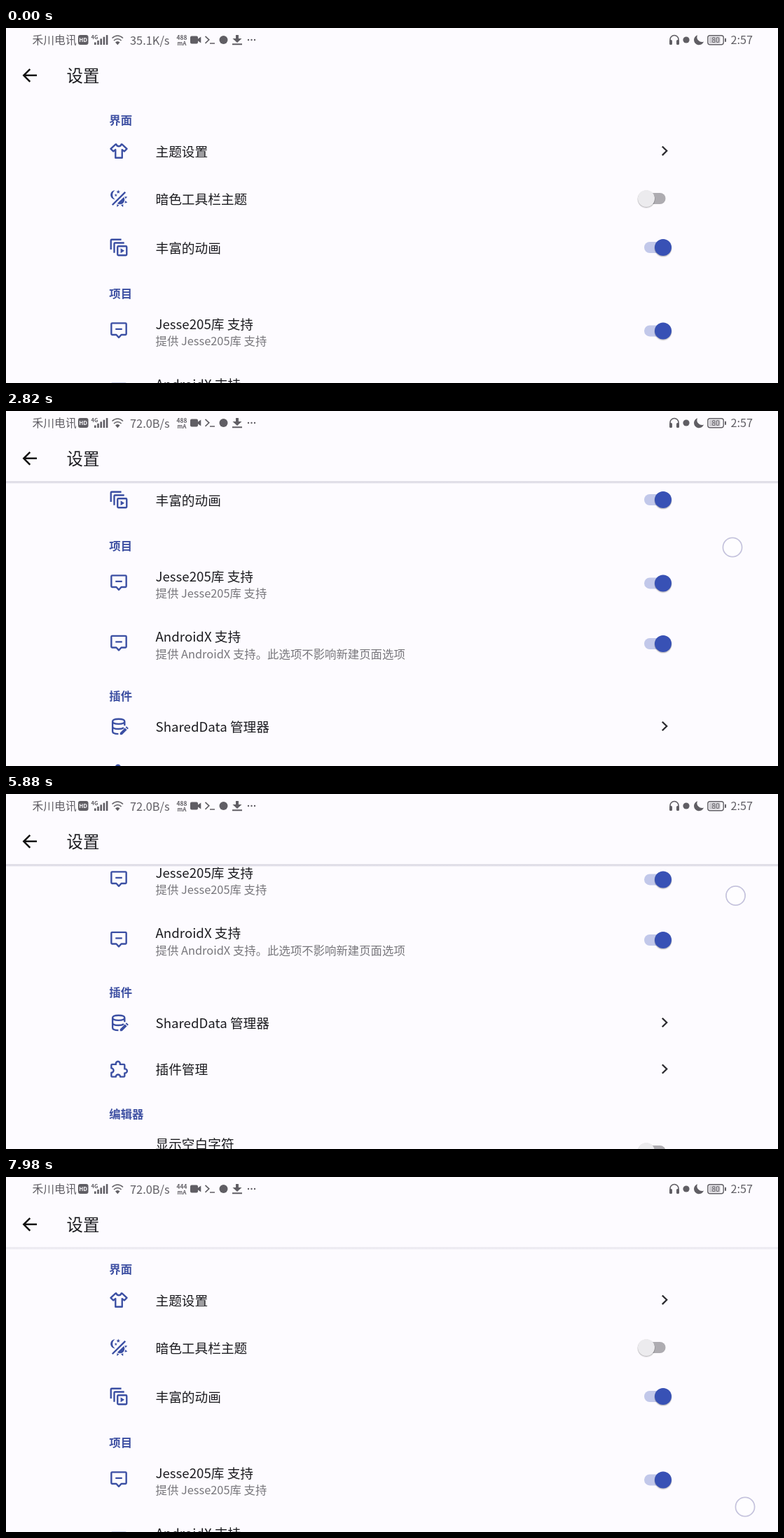
An HTML page for the animation above (8000 ms loop, 1102 by 508 pixels).

```html
<!DOCTYPE html>
<html lang="zh-CN">
<head>
<meta charset="utf-8">
<title>设置</title>
<style>
html, body { margin: 0; width: 100%; height: 100%; overflow: hidden; background: #fdfbff; }
svg { display: block; width: 1102px; height: 508px; }
text { font-family: "Noto Sans CJK SC", "Noto Sans CJK JP", "Noto Sans CJK", "Noto Sans", sans-serif; fill: #1b1b1f; white-space: pre; }
.title { font-size: 23.4px; font-weight: 500; }
.head { font-size: 16.4px; font-weight: 700; fill: #3f51a3; }
.name { font-size: 18.7px; }
.note { font-size: 16.4px; fill: #77767b; }
.bar { font-size: 15.8px; fill: #605e64; }
.tiny { font-size: 8px; font-weight: 700; fill: #605e64; }
.line { fill: none; stroke: #3b4fa3; stroke-width: 2; stroke-linejoin: round; }
.solid { fill: #3b4fa3; }
.grey { fill: #605e64; }
.greyLine { fill: none; stroke: #605e64; stroke-width: 1.6; }
</style>
</head>
<body>
<svg viewBox="0 0 1102 508">
  <defs>
    <clipPath id="view"><rect y="101" width="1102" height="407"/></clipPath>
    <linearGradient id="shade" x2="0" y2="1">
      <stop offset="0" stop-color="#d5d3dd"/>
      <stop offset=".4" stop-color="#dedce6"/>
      <stop offset="1" stop-color="#fdfbff"/>
    </linearGradient>
  </defs>
  <rect width="1102" height="508" fill="#fdfbff"/>
  <g clip-path="url(#view)"><g id="list"></g></g>
  <rect id="divider" y="100.5" width="1102" height="4" fill="url(#shade)" opacity="0"/>
  <path d="M44 67.8H26M34.3 58.8L25.3 67.8L34.3 76.8" fill="none" stroke="#111" stroke-width="2.5"/>
  <text class="title" x="86.5" y="77.3">设置</text>
  <g id="status"></g>
  <g id="touch" visibility="hidden">
    <circle r="14" fill="#fff" fill-opacity=".55" stroke="#fff" stroke-width="3.6"/>
    <circle r="13.6" fill="none" stroke="#c6c3de" stroke-width="1.8"/>
  </g>
</svg>
<script>
const LOOP = 8000;
const $ = id => document.getElementById(id);

const text = (cls, x, y, s, extra = '') => `<text class="${cls}" x="${x}" y="${y}" ${extra}>${s}</text>`;
const path = (cls, d, extra = '') => `<path class="${cls}" d="${d}" ${extra}/>`;

// Icons on a 24-unit grid
const icons = {
  shirt: path('line', 'M8 4L2.3 9.4L5.3 12.4L8 10.4V20.2H16V10.4L18.7 12.4L21.7 9.4L16 4H15C14.4 7 9.6 7 9 4Z'),
  theme: path('solid', 'M7.5 2c-1.79 1.15-3 3.18-3 5.5s1.21 4.35 3.03 5.5C4.46 13 2 10.54 2 7.5A5.5 5.5 0 0 1 7.5 2' +
    'm11.57 1.5l1.43 1.43L4.93 20.5L3.5 19.07L19.07 3.5m-6.18 2.43L11.41 5L9.97 6l.42-1.7L9 3.24l1.75-.12l.58-1.65L12 3.1l1.73.03l-1.35 1.13l.51 1.67' +
    'm-3.3 3.61l-1.16-.73l-1.12.78l.34-1.32l-1.09-.83l1.36-.09l.45-1.29l.51 1.27l1.36.03l-1.05.87l.4 1.31' +
    'M19 13.5a5.5 5.5 0 0 1-5.5 5.5c-1.22 0-2.35-.4-3.26-1.07l7.69-7.69c.67.91 1.07 2.04 1.07 3.26' +
    'm-4.4 6.58l2.77-1.15l-.24 3.35l-2.53-2.2m4.33-2.7l1.15-2.77l2.2 2.54l-3.35.23m1.15-4.96l-1.14-2.78l3.34.24l-2.2 2.54' +
    'M9.63 18.93l2.77 1.15l-2.53 2.19l-.24-3.34z'),
  layers: path('line', 'M2.5 14.5V3.5a1 1 0 0 1 1-1H15M6.5 18.5V7.5a1 1 0 0 1 1-1H18.5M10.5 11.5a1 1 0 0 1 1-1H20.5a1 1 0 0 1 1 1V20.5a1 1 0 0 1-1 1H11.5a1 1 0 0 1-1-1Z') +
    path('solid', 'M14.2 13v6l4.6-3z'),
  message: path('line', 'M3 4a1 1 0 0 1 1-1H20a1 1 0 0 1 1 1V16a1 1 0 0 1-1 1H15L12 20.3L9 17H4a1 1 0 0 1-1-1ZM8 10.2H16'),
  data: path('line', 'M4.5 6C4.5 2 19 2 19 6S4.5 10 4.5 6V18C4.5 20 8 21 11.5 21M4.5 12C4.5 14 8 15 11.7 15C14 15 16.5 14.6 18 13.5M19 6V11') +
    path('solid', 'M13.5 19.6V22H15.9L21.8 16.1L19.4 13.7ZM20.1 13L21.3 11.8L23.7 14.2L22.5 15.4Z'),
  puzzle: path('line', 'M3 10.6V7a1 1 0 0 1 1-1H8.5V5a2.5 2.5 0 0 1 5 0V6H18a1 1 0 0 1 1 1V11.5H19.5a2.5 2.5 0 0 1 0 5H19V20a1 1 0 0 1-1 1H13.8a2.7 2.7 0 0 0-5.4 0H4a1 1 0 0 1-1-1V16a2.7 2.7 0 0 0 0-5.4Z'),
};
const icon = (name, y) => `<g transform="translate(146.8 ${y - 14.2}) scale(1.185)">${icons[name]}</g>`;

const chevron = y => path('', `M936.8 ${y - 6.3}L943.2 ${y}L936.8 ${y + 6.3}`, 'fill="none" stroke="#2b2a2f" stroke-width="2.3"');

function toggle(y, on) {
  const x = on ? 938 : 914;
  return `<rect x="${on ? 911 : 908}" y="${y - 8}" width="${on ? 36 : 33.5}" height="16" rx="8" fill="${on ? '#c2c8ea' : '#aeacb1'}"/>
    <circle cx="${x}" cy="${y + 1.3}" r="12.7" fill="#000" opacity=".1"/>
    <circle cx="${x}" cy="${y + .7}" r="12.3" fill="#000" opacity=".14"/>
    <circle cx="${x}" cy="${y}" r="12" fill="${on ? '#3851b5' : '#ecebee'}"/>`;
}

const head = (y, s) => text('head', 147.3, y + 6.1, s);
const name = (y, s) => text('name', 213.5, y + 7, s);
const note = (y, s) => text('note', 213.5, y + 6.1, s);

$('list').innerHTML = [
  head(132, '界面'),
  icon('shirt', 176), name(176.5, '主题设置'), chevron(175.8),
  icon('theme', 244), name(244.7, '暗色工具栏主题'), toggle(244, false),
  icon('layers', 314), name(314.5, '丰富的动画'), toggle(314, true),
  head(380, '项目'),
  icon('message', 433), name(423.7, 'Jesse205库 支持'), note(448, '提供 Jesse205库 支持'), toggle(433.4, true),
  icon('message', 519.5), name(510.2, 'AndroidX 支持'), note(534.5, '提供 AndroidX 支持。此选项不影响新建页面选项'), toggle(520, true),
  head(594.5, '插件'),
  icon('data', 638.4), name(639, 'SharedData 管理器'), chevron(638),
  icon('puzzle', 705), name(705.3, '插件管理'), chevron(704.5),
  head(769, '编辑器'),
  name(811.8, '显示空白字符'), toggle(822, false),
].join('');

const bars = [0, 1, 2, 3, 4].map(i =>
  `<rect class="grey" x="${126 + i * 4.2}" y="${20.5 - i * 2.6}" width="2.6" height="${3.5 + i * 2.6}"/>`).join('');
const dots = [346, 350.5, 355].map(x => `<circle class="grey" cx="${x}" cy="17" r="1.2"/>`).join('');

$('status').innerHTML = [
  text('bar', 37.5, 23.4, '禾川电讯'),
  '<rect class="grey" x="103" y="10" width="14.5" height="14" rx="3"/>',
  text('tiny', 110.2, 20, 'HD', 'text-anchor="middle" style="fill:#fdfbff"'),
  text('tiny', 121.5, 16.3, '4G', 'style="font-size:7.5px"'), bars,
  path('greyLine', 'M151.5 14.5Q159.3 7.5 167 14.5M154 18Q159.3 13 164.6 18'),
  path('grey', 'M156 20.6Q159.3 17.6 162.6 20.6L159.3 24.2Z'),
  text('bar', 177, 23.6, '', 'id="speed" style="font-size:16.4px"'),
  text('tiny', 251, 17.3, '', 'id="amps" text-anchor="middle" style="font-size:8.4px"'),
  text('tiny', 251, 25, 'mA', 'text-anchor="middle"'),
  path('grey', 'M265 11.5H272a2 2 0 0 1 2 2V15.5L278.3 12.5V21.5L274 18.5V20.5a2 2 0 0 1-2 2H265a2 2 0 0 1-2-2V13.5a2 2 0 0 1 2-2Z'),
  path('greyLine', 'M284.5 11.8L289.8 16.8L284.5 21.8M291 22H298'),
  '<circle class="grey" cx="310.5" cy="17" r="6"/>',
  path('grey', 'M328 10H332V15H336.5L330 21L323.5 15H328ZM323 22.2H337V24.2H323Z'), dots,
  path('greyLine', 'M948 19V16.5a6 6 0 0 1 12 0V19'),
  '<rect class="grey" x="947" y="17" width="4" height="7" rx="1.5"/><rect class="grey" x="957" y="17" width="4" height="7" rx="1.5"/>',
  '<circle class="grey" cx="971" cy="17" r="4.6"/>',
  path('grey', 'M987 10.2A7.2 7.2 0 1 0 996 19.5A7 7 0 0 1 987 10.2Z'),
  '<rect class="greyLine" x="1001.8" y="10.8" width="22.4" height="13" rx="3" style="stroke-width:1.4"/>',
  '<rect class="grey" x="1003.6" y="12.6" width="16" height="9.4" rx="1" opacity=".3"/>',
  '<rect class="grey" x="1026" y="14.5" width="2" height="5.5" rx="1"/>',
  text('tiny', 1013, 21.2, '80', 'text-anchor="middle" style="font-size:10.5px;font-weight:500"'),
  text('bar', 1034.5, 23.4, '2:57', 'style="font-size:16.2px"'),
].join('');

// Each drag: [ms, finger x, finger y, scroll]
const drags = [
  [[1940, 1040.5, 404, 0], [2060, 1040.5, 404, 0], [2120, 1039, 381, 0], [2260, 1035, 327, 52.5], [2360, 1035, 327, 52.5],
   [2820, 1037, 195, 187], [2920, 1037, 195, 187], [3620, 1045, 86, 308], [3660, 1045, 84, 310], [3760, 1045, 84, 310],
   [4200, 1044, 110, 285], [4480, 1044, 110, 285], [5040, 1045, 84, 311]],
  [[5880, 1041.5, 145.5, 311], [6000, 1041.5, 145.5, 311], [6060, 1041.5, 161, 311], [6740, 1042, 397, 75], [6840, 1042, 397, 75],
   [7020, 1042, 429, 43.2], [7120, 1042, 429, 43.2], [7580, 1052, 460, 12], [7680, 1052, 460, 12], [7900, 1055, 472, 0], [LOOP, 1055, 472, 0]],
];

function sample(keys, t) {
  const i = keys.findIndex(k => k[0] > t);
  if (i < 1) return keys[i < 0 ? keys.length - 1 : 0];
  const a = keys[i - 1], b = keys[i], p = (t - a[0]) / (b[0] - a[0]);
  return a.map((v, j) => v + (b[j] - v) * p);
}

const clamp = v => Math.max(0, Math.min(1, v));

function draw(t) {
  const [first, second] = drags;
  const [, x, y, scroll] = sample(t < second[0][0] ? first : second, t);
  const touching = drags.some(d => t >= d[0][0] && t < d[d.length - 1][0]);
  $('list').setAttribute('transform', `translate(0 ${-scroll})`);
  $('touch').setAttribute('transform', `translate(${x} ${y})`);
  $('touch').setAttribute('visibility', touching ? 'visible' : 'hidden');
  $('divider').setAttribute('opacity', Math.min(clamp((t - 2110) / 280), clamp((8080 - t) / 180)));
  $('speed').textContent = t < 2500 ? '35.1K/s' : '72.0B/s';
  $('amps').textContent = t < 7300 ? '488' : '444';
}

const start = performance.now();
function tick() {
  draw((performance.now() - start) % LOOP);
  requestAnimationFrame(tick);
}
tick();
</script>
</body>
</html>
```
